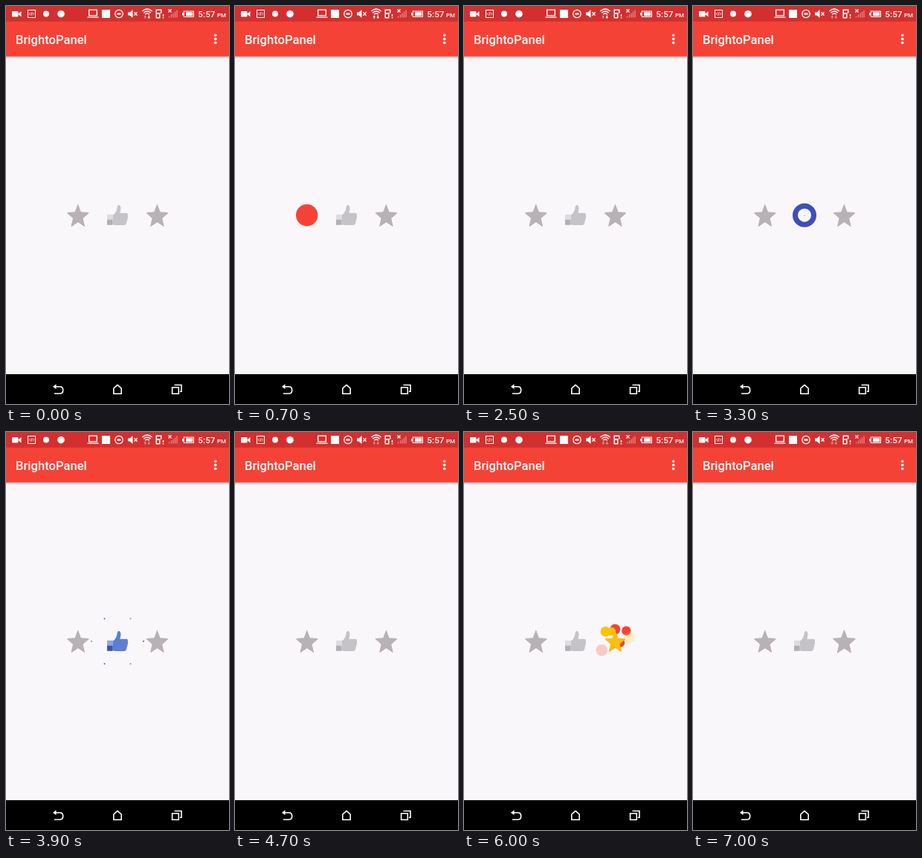
Write an HTML page that moves like this. It is 300 by 534 pixels and loops after 7.1 s.

```html
<!DOCTYPE html>
<html lang="en">
<head>
<meta charset="utf-8">
<title>Buttons</title>
<style>
  html, body { margin: 0; width: 100%; height: 100%; overflow: hidden; background: #f9f7fa; }
  svg { display: block; width: 100%; height: 100%; }
  text { font-family: Roboto, "Open Sans", sans-serif; font-weight: 500; fill: #fff; }
</style>
</head>
<body>
<svg viewBox="0 0 300 534">
  <defs>
    <linearGradient id="shade" x2="0" y2="1">
      <stop offset="0" stop-color="#000" stop-opacity=".3"/>
      <stop offset="1" stop-color="#000" stop-opacity="0"/>
    </linearGradient>
    <path id="hand" d="M-6 -.5 C-3 -2 -1 -6 -.3 -11 Q0 -14 2.2 -13.6 Q5.2 -12 4.2 -7 L3.4 -3 H12 Q14.5 -2.6 13.8 .6 Q15 2.6 13.4 4.4 Q14 6.8 12.4 8.2 Q12.8 10.6 11.4 11.7 Q11 13.4 8.6 13.4 H-2 Q-5 13.4 -6 12.4Z"/>
  </defs>
  <rect width="300" height="534" fill="#f9f7fa"/>
  <rect y="67" width="300" height="4" fill="url(#shade)"/>
  <rect y="20" width="300" height="47.5" fill="#f44336"/>
  <rect width="300" height="20.8" fill="#d32f2f"/>
  <rect y="494" width="300" height="40" fill="#000"/>

  <!-- status bar -->
  <g fill="#fff">
    <rect x="8" y="7" width="8.5" height="7.5" rx="1"/>
    <path d="M16 10.7 L20.5 7 V14.5Z"/>
    <circle cx="54" cy="10.5" r="4"/>
    <circle cx="74" cy="10.7" r="4.8"/>
    <rect x="129" y="5" width="11" height="11"/>
    <path d="M164 8.5 h2.5 L170.5 5 V16 L166.5 12.5 H164Z"/>
    <path d="M201.5 4.5 h8 v5 h-2 v7 h-6Z M210.8 11 h1.5 v3 h-1.5Z M210.8 15 h1.5 v1.5 h-1.5Z"/>
    <path d="M203 6 h5 v3 h-5Z M203 11 h3 v4 h-3Z" fill="#d32f2f"/>
    <path d="M237 9 h2 v3.5 h-2Z M242 8.3 h9.3 v5 H242Z"/>
  </g>
  <g fill="none" stroke="#fff">
    <rect x="239.3" y="7" width="13.2" height="7.5"/>
    <rect x="29.5" y="5.5" width="10" height="10"/>
    <path d="M33 8.8 L31.3 10.5 L33 12.2 M36 8.8 L37.7 10.5 L36 12.2 M35 8.3 L34 12.7" stroke-width=".8"/>
    <path d="M111.7 5.2 H122.3 V12.8 H111.7Z M109.5 15.2 H124.5" stroke-width="1.3"/>
    <circle cx="152" cy="10.5" r="5.2" stroke-width="1.3"/>
    <path d="M149.500 10.500 H154.500" stroke-width="2.400"/>
    <path d="M172.500 8.300 L176.500 12.700 M176.500 8.300 L172.500 12.700" stroke-width="1.300"/>
    <path d="M183.300 7 Q190 1.200 196.700 7 M185.200 9.200 Q190 5 194.800 9.200 M187.200 11.300 Q190 8.800 192.800 11.300" stroke-width="1.400"/>
    <path d="M218.500 4.500 L222.500 8.500 M222.500 4.500 L218.500 8.500" stroke-width="1.300"/>
    <path d="M219.500 15.500 V13.500 M222.500 15.500 V11.500 M225 15.500 V9.500 M227.500 15.500 V7.500 M230 15.500 V5.500" stroke="#e58a8a" stroke-width="1.300"/>
  </g>
  <path id="up" d="M187.300 12.600 l2 2 h-1.200 v2.200 h-1.600 v-2.200 h-1.200Z"/>
  <path id="down" d="M192.300 17 l2 -2 h-1.200 v-2.200 h-1.600 v2.200 h-1.200Z"/>
  <text x="258.300" y="15" font-size="11.800">5:57</text>
  <text x="284" y="15" font-size="8">PM</text>

  <!-- app bar -->
  <text x="13" y="50.500" font-size="16.600">BrightoPanel</text>
  <g fill="#fff">
    <circle cx="281.700" cy="39.300" r="1.800"/>
    <circle cx="281.700" cy="44.300" r="1.800"/>
    <circle cx="281.700" cy="49.300" r="1.800"/>
  </g>

  <!-- navigation bar -->
  <g fill="none" stroke="#fff" stroke-width="1.600">
    <path d="M66 510.700 H72.500 Q76.700 510.700 76.700 515.300 Q76.700 520 72.500 520 H65"/>
    <path d="M67.500 507.300 L63 510.700 L67.500 514Z" fill="#fff" stroke="none"/>
    <path d="M144.800 520.200 V513 L150 508.300 L155.200 513 V520.200Z" stroke-linejoin="round"/>
    <path d="M223.600 511.800 H232.300 V520.200 H223.600Z M226.500 508.500 H236 V517.200 H234"/>
  </g>
  <g id="stage"></g>
</svg>
<script>
const LOOP = 7100, STEP = 100;
const byId = id => document.getElementById(id);
const clamp = v => Math.max(0, Math.min(1, v));
const span = (t, start, length) => clamp((t - start) / length);
const decel = p => 1 - (1 - p) ** 2;
const overshoot = (p, k) => 1 + (p - 1) ** 2 * ((k + 1) * (p - 1) + k);
const place = (x, y, scale, body) => scale <= 0 ? "" :
  `<g transform="translate(${x} ${y}) scale(${scale})">${body}</g>`;
const disc = (x, y, r, fill, opacity = 1) => r <= 0 ? "" :
  `<circle cx="${x}" cy="${y}" r="${r}" fill="${fill}" opacity="${opacity}"/>`;

const starPoints = Array.from({ length: 10 }, (_, i) => {
  const r = i % 2 ? 0.44 : 1, a = i * Math.PI / 5;
  return `${(15.6 * r * Math.sin(a)).toFixed(2)},${(1.4 - 16.6 * r * Math.cos(a)).toFixed(2)}`;
}).join(" ");
const star = (fill, edge) =>
  `<polygon points="${starPoints}" fill="${edge}" transform="translate(.2 .7)"/>
   <polygon points="${starPoints}" fill="${fill}"/>`;
const thumb = (hand, light, dark) =>
  `<path d="M-14 -1 H-6 V13 H-14Z" fill="${light}"/>
   <path d="M-14 6 H-6.5 V13 H-14Z" fill="${dark}"/>
   <use href="#hand" fill="${hand}"/>`;

const greyStar = star("#b6b2b8", "#c9a58c");
const goldStar = star("#f9bf13", "#e5a51a");
const greyThumb = thumb("#c5c3c7", "#dedce0", "#b2b0b4");
const blueThumb = thumb("#5c7fd0", "#8fa5e0", "#3f51b5");

const RED = "#f44336", GOLD = "#ffc107", BLUE = "#3f4fb5", Y = 280.7;
const release = (t, start) => overshoot(span(t, start, 400), 1.2);

function discButton(t) {
  const x = 96.7;
  if (t < 500) return place(x, Y, 1, greyStar);
  if (t >= 2100) return place(x, Y, release(t, 2100), greyStar);
  const radius = 16 * decel(span(t, 450, 350));
  return disc(x, Y, radius, RED, 1 - span(t, 1200, 300)) +
    place(x, Y, t < 750 ? 0 : overshoot(span(t, 750, 400), 2), goldStar);
}

function ringButton(t) {
  const x = 150, s = t - 3032;
  if (t < 3000) return place(x, Y, 1, greyThumb);
  if (t >= 4300) return place(x, Y, release(t, 4300), greyThumb);
  const outer = 16 * decel(span(s, 0, 250)), hole = 16 * decel(span(s, 200, 200));
  let out = outer > hole
    ? `<circle cx="${x}" cy="${Y}" r="${(outer + hole) / 2}" fill="none" stroke="${BLUE}" stroke-width="${outer - hole}"/>`
    : "";
  const p = span(s, 50, 900);
  if (p > 0.3 && p < 1) {
    const reach = 14 + 21 * decel(span(p, 0.3, 0.6));
    const size = 2.6 * (1 - span(p, 0.75, 0.25));
    for (let i = 0; i < 6; i++) {
      const a = i * Math.PI / 3;
      out += disc(x + reach * Math.cos(a), Y + reach * Math.sin(a), size, i % 2 ? "#7986cb" : BLUE);
    }
  }
  return out + place(x, Y, overshoot(span(s, 265, 350), 3), blueThumb);
}

// offset x, offset y, radius, colour, moment the piece has faded
const pieces = [
  [7, 2, 6, RED, .8], [0, -16, 7, RED, .85], [15, -14, 6.2, RED, .9],
  [-13, -13, 6.7, GOLD, .9], [-5, -13, 5.8, GOLD, .8],
  [19, -5, 7.5, GOLD, .51], [-18, 12, 7.8, RED, .525]
];

function burstButton(t) {
  const x = 203.3;
  if (t >= 6700) return place(x, Y, release(t, 6700), greyStar);
  if (t < 5300) return place(x, Y, 1, greyStar);
  const p = span(t, 5500, 1100), travel = Math.min(p / .4545, 1.5);
  let out = place(x, Y, 1 - span(t, 5250, 250), greyStar);
  if (p > 0 && p < 1) for (const [dx, dy, r, fill, end] of pieces) {
    const lift = dy > 0 ? Math.min(travel, 1) : travel;
    out += disc(x + dx * travel, Y + dy * lift, r * Math.min(1, .4 + travel), fill, clamp((end - p) / .28));
  }
  return out + place(x, Y, .93 * span(t, 5600, 350) + .07 * span(t, 6000, 200), goldStar);
}

function render(time) {
  const t = Math.floor(time % LOOP / STEP) * STEP;
  byId("up").setAttribute("fill", t >= 500 && t < 2100 ? "#fff" : "#e88b8b");
  byId("down").setAttribute("fill", t < 3000 ? "#fff" : "#e88b8b");
  byId("stage").innerHTML = discButton(t) + ringButton(t) + burstButton(t);
}

const begin = performance.now();
function tick() {
  render(performance.now() - begin);
  requestAnimationFrame(tick);
}
tick();
</script>
</body>
</html>
```
